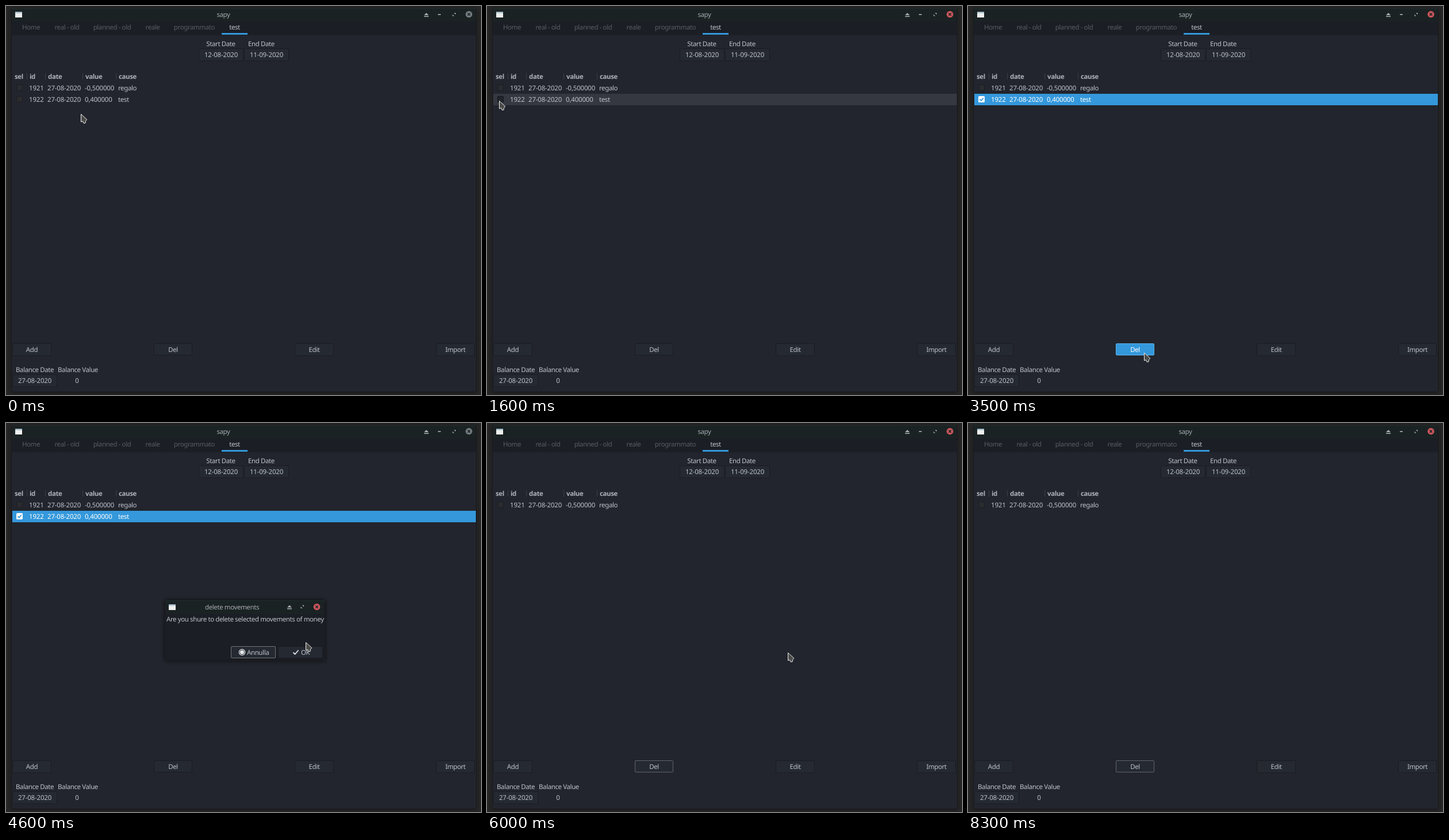
An HTML page that plays this animation: 826 by 678 pixels, repeating every 8500 ms.

```html
<!DOCTYPE html>
<html lang="en">
<head>
<meta charset="utf-8">
<title>sapy</title>
<style>
html, body { margin: 0; width: 100%; height: 100%; overflow: hidden; background: #272727; }
svg { display: block; }
text {
  font: 11.5px "Noto Sans", "Open Sans", sans-serif;
  letter-spacing: -.4px;
  fill: #bdc2cb;
  text-rendering: geometricPrecision;
  white-space: pre;
}
.num { letter-spacing: -.2px; }
.narrow text { font-size: 12px; font-stretch: semi-condensed; letter-spacing: 0; }
text.mid { text-anchor: middle; }
text.dim { fill: #585c64; }
text.title { fill: #a4abb0; }
text.head { font-weight: bold; fill: #adb1b9; }
.btn rect { fill: #252931; stroke: #1a1c22; }
.btn.press rect { fill: #3498db; stroke: #5fb4ec; }
.btn.press text { fill: #fff; }
.btn.focus rect { stroke: #71747a; }
#del.focus rect { stroke-dasharray: 1 1; stroke: #a0a3a8; }
.sel text { fill: #fff; }
.glyph { fill: #a9b0b4; }
.close { fill: #747c80; }
.close.on { fill: #cc575d; }
.box { fill: #2a2b2f; stroke: #1b1d21; }
.box.down { fill: #22252d; stroke: #111317; }
</style>
</head>
<body>
<svg id="stage" width="826" height="678" viewBox="0 0 826 678"></svg>
<script>
const stage = document.getElementById('stage');
const LOOP = 8500, STEP = 100;

const text = (x, y, s, cls = '') => `<text x="${x}" y="${y}" class="${cls}">${s}</text>`;
const rect = (x, y, w, h, fill, more = '') =>
  `<rect x="${x}" y="${y}" width="${w}" height="${h}" fill="${fill}" ${more}/>`;
const button = (x, y, w, h, label, id = '', cls = 'mid', tx = x + w / 2, icon = '') =>
  `<g class="btn" id="${id}"><rect x="${x + .5}" y="${y + .5}" width="${w - 1}" height="${h - 1}" rx="1.5"/>` +
  icon + text(tx, y + h / 2 + 4.2, label, cls) + '</g>';

const appIcon = (x, y) => rect(x, y, 12, 10, '#eef0ee') + rect(x, y, 12, 2.5, '#a9bfd0');
const eject = (x, y) => `<path class="glyph" d="M${x - 4} ${y + 1}l4-4 4 4zm0 1.5h8v1.5h-8z"/>`;
const expand = (x, y) => `<path class="glyph" d="M${x} ${y - 2.5}h3v3zM${x - 2.5} ${y}v3h3z"/>`;
const close = (x, y, id, cls = '') =>
  `<circle id="${id}" class="close ${cls}" cx="${x}" cy="${y}" r="5.8"/>` +
  `<path d="M${x - 2.2} ${y - 2.2}l4.4 4.4m0-4.4l-4.4 4.4" stroke="#1b2224" stroke-width="1.5"/>`;

const row = (y, id, date, value, cause) =>
  text(40, y, id, 'num') + text(72, y, date, 'num') + text(137, y, value, 'num') + text(195, y, cause);
const checkbox = (y, id = '') =>
  `<rect id="${id}" class="box" x="18.5" y="${y}" width="10" height="10" rx="1.5"/>`;

const tabs = [[43.5, 'Home'], [106, 'real - old'], [184.5, 'planned - old'], [255, 'reale'], [327.5, 'programmato']];
const heads = [[15, 'sel'], [41, 'id'], [73, 'date'], [138, 'value'], [196, 'cause']];

stage.innerHTML = `
<defs>
  <filter id="blur" x="-10%" y="-20%" width="120%" height="140%"><feGaussianBlur stdDeviation="3"/></filter>
</defs>
${rect(0, 0, 826, 678, '#272727')}
${rect(8, 4, 811, 672, '#151515', 'filter="url(#blur)" opacity=".6"')}
${rect(9, 4, 809, 669, '#181a20', 'rx="2"')}
${rect(10, 4, 807, 23, '#1b2223')}
${rect(10, 4, 807, 1, '#1e2c2b')}
${rect(10, 27, 807, 24, '#1b1e25')}
${rect(10, 51, 807, 621, '#22252d')}
${appIcon(16, 10)}
${text(378, 19, 'sapy', 'mid title')}
${eject(731, 15)}${rect(751, 14, 5, 1.6, '#a9b0b4')}${expand(779, 14.5)}
${close(805, 14.5, 'mainClose')}
${tabs.map(([x, s]) => text(x, 41.2, s, 'mid dim')).join('')}
${text(397.5, 41.2, 'test', 'mid')}
${rect(375, 47, 45, 3, '#3498db')}
${text(373.5, 70.2, 'Start Date', 'mid')}${text(444, 70.2, 'End Date', 'mid')}
${button(335, 74, 78, 22, '12-08-2020', '', 'mid num')}
${button(414, 74, 78, 22, '11-09-2020', '', 'mid num')}
${heads.map(([x, s]) => text(x, 127.2, s, 'head')).join('')}
${[36, 68, 133, 191].map(x => rect(x, 117, 1, 11, '#3b3e45')).join('')}
${checkbox(137.5)}${row(147.2, '1921', '27-08-2020', '-0,500000', 'regalo')}
<g id="second">
  <rect id="strip" x="11" y="153" width="806" height="20"/>
  ${checkbox(157.5, 'tick')}
  <g id="checked">${rect(18, 157, 11, 11, '#fff', 'rx="1.5"')}
    <path d="M20.5 162.5l2.3 2.4 4-4.6" fill="none" stroke="#3498db" stroke-width="1.7"/></g>
  ${row(167.2, '1922', '27-08-2020', '0,400000', 'test')}
</g>
${button(11, 588, 68, 22, 'Add')}
${button(257, 588, 67, 21, 'Del', 'del')}
${button(502, 588, 68, 22, 'Edit')}
${button(748, 588, 67, 22, 'Import')}
${text(17, 638.2, 'Balance Date')}${text(90, 638.2, 'Balance Value')}
${button(11, 642, 78, 22, '27-08-2020', '', 'mid num')}
${text(123.5, 657.2, '0', 'mid num')}
<g id="dialog">
  ${rect(276, 309, 279, 106, '#0c0d10', 'filter="url(#blur)" opacity=".7"')}
  ${rect(278, 309, 275, 103, '#1b1e25')}
  ${rect(278, 309, 275, 24, '#1b2223')}
  ${rect(278, 309, 275, 1, '#1f302d')}
  ${appIcon(283, 316)}
  ${text(393, 324.8, 'delete movements', 'mid title')}
  ${eject(493, 320.5)}${expand(515, 320)}${close(540.5, 320.5, 'dlgClose', 'on')}
  ${text(279, 345.8, 'Are you shure to delete selected movements of money')}
  ${button(391, 389, 78, 21, 'Annulla', 'cancel', '', 419,
    '<circle cx="410.5" cy="399.5" r="5.2" fill="none" stroke="#e4e6e9" stroke-width="1.2"/><circle cx="410.5" cy="399.5" r="3.6" fill="#e4e6e9"/>')}
  ${button(473, 389, 78, 21, 'OK', 'ok', '', 513,
    '<path d="M499.5 400l3 3 6-7" fill="none" stroke="#e4e6e9" stroke-width="1.8"/>')}
</g>
<path id="cursor" d="M.5.5V14L3.5 12.8L5.2 16.5L8 16L8.5 12.5L10.8 10Z" fill="#4b4b49" stroke="#eee" stroke-linejoin="round"/>`;

// Prefer the semi-condensed face when it is installed.
const pen = document.createElement('canvas').getContext('2d');
pen.font = 'semi-condensed 12px "Noto Sans", "Open Sans", sans-serif';
stage.classList.toggle('narrow', pen.measureText('programmato').width < 73);

const smooth = u => u * u * (3 - 2 * u);
const glide = u => 1 - (1 - u) ** 1.87;

// Pointer moves: first step, last step, bend point, end point, easing.
const home = [130, 188];
const moves = [
  [200, 800, [70, 166], [21, 165], smooth],
  [2200, 2400, [80, 300], [156, 414], smooth],
  [2700, 3200, [250, 690], [306, 604], smooth],
  [4100, 4600, [390, 470], [521, 382], smooth],
  [5200, 5400, [447, 390], [521, 395], smooth],
  [5600, 5800, [521, 398], [523, 400], smooth],
  [7100, 7800, [279, 144], [35, 3], glide],
  [8000, 8200, [35, -3], [35, -7], smooth]
];

function pointer(t) {
  let from = home;
  for (const [first, last, bend, to, ease] of moves) {
    if (t < first) break;
    const u = ease(Math.min(1, (t - first + STEP) / (last - first + STEP)));
    from = from.map((a, i) => a * (1 - u) ** 2 + 2 * bend[i] * u * (1 - u) + to[i] * u * u);
  }
  return from;
}

const el = id => document.getElementById(id);
const show = (id, on) => el(id).setAttribute('visibility', on ? 'inherit' : 'hidden');
const mark = (id, cls, on) => el(id).classList.toggle(cls, on);

function draw(now) {
  const t = Math.floor(now % LOOP / STEP) * STEP;
  const during = (a, b) => t >= a && t < b;
  const [x, y] = pointer(t);
  const chosen = during(1700, 6000);
  const hover = t < 1700 && y < 173;

  el('cursor').setAttribute('transform', `translate(${Math.round(x)} ${Math.round(y)})`);
  show('cursor', t < 7900 || during(8000, 8300));
  show('second', t < 6000);
  show('checked', chosen);
  show('tick', t < 1700);
  mark('second', 'sel', chosen);
  mark('tick', 'down', during(1600, 1700));
  el('strip').setAttribute('fill', chosen ? '#3498db' : hover ? '#353840' : 'none');
  mark('mainClose', 'on', during(1600, 3700) || t >= 6000);
  mark('del', 'press', during(3500, 3700));
  mark('del', 'focus', t >= 6000);
  show('dialog', during(3700, 6000));
  mark('cancel', 'focus', during(3800, 5900));
  mark('ok', 'press', during(5900, 6000));
}

const start = performance.now();
function frame() {
  draw(performance.now() - start);
  requestAnimationFrame(frame);
}
frame();
</script>
</body>
</html>
```
